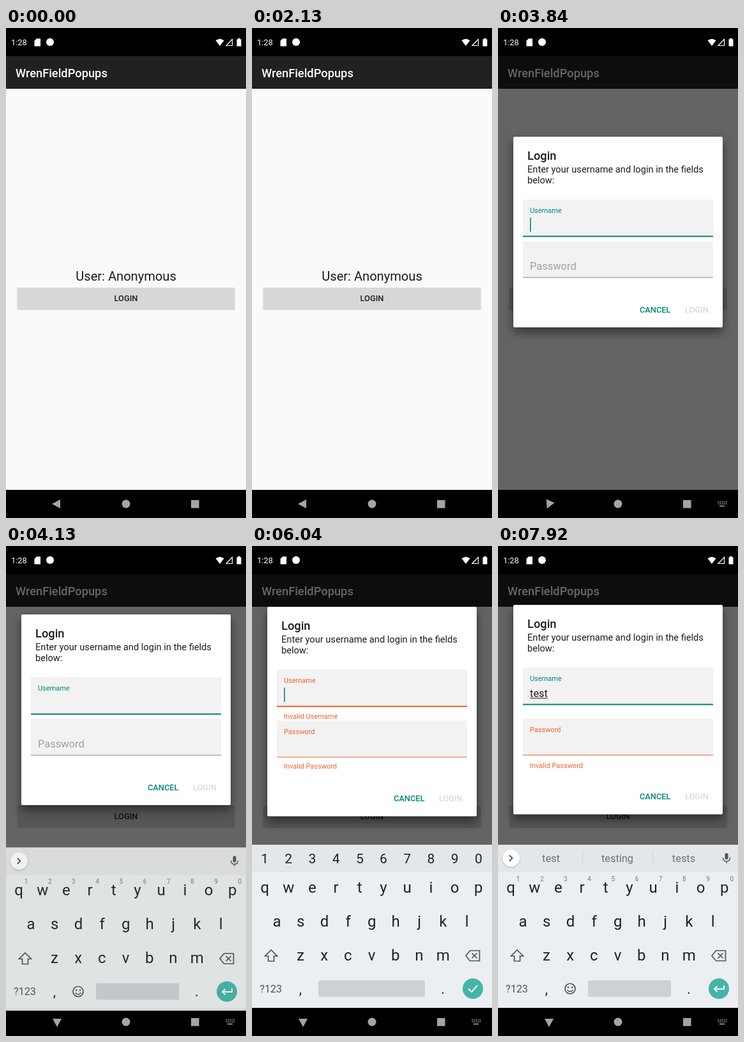
These frames come from a looping animation (376 px wide and 766 px high, 8000 ms). An HTML page:

```html
<!DOCTYPE html>
<html lang="en">
<head>
<meta charset="utf-8">
<title>Login dialog</title>
<style>
html, body { margin: 0; width: 100%; height: 100%; overflow: hidden; background: #000; }
svg { display: block; width: 376px; height: 766px; font-family: Roboto, sans-serif; }
.card { filter: drop-shadow(0 7px 8px rgba(0, 0, 0, .5)); }
.raised { filter: drop-shadow(0 1px 1px rgba(0, 0, 0, .25)); }
</style>
</head>
<body>
<svg id="stage" viewBox="0 0 376 766"></svg>
<script>
const LOOP = 8000;
const INK = '#1c1c1c', TEAL = '#00857a', RED = '#f0602c', HINT = '#9f9f9f';
const KEY = '#1b2427', ICON = '#4c5558', SPACE = '#cdd1d3', NAV = '#a4a4a4';

// Text placed by the middle of its capitals
function text(s, x, cy, size, fill, opt = '') {
  return `<text x="${x}" y="${(cy + size * .355).toFixed(2)}" font-size="${size}" fill="${fill}" ${opt}>${s}</text>`;
}
const mid = 'text-anchor="middle"', bold = 'font-weight="500"';
const rect = (x, y, w, h, fill, opt = '') =>
  `<rect x="${x}" y="${y}" width="${w}" height="${h}" fill="${fill}" ${opt}/>`;
const circle = (x, y, r, fill, opt = '') => `<circle cx="${x}" cy="${y}" r="${r}" fill="${fill}" ${opt}/>`;
const path = (d, fill, opt = '') => `<path d="${d}" fill="${fill}" ${opt}/>`;
const line = (d, color, w) => path(d, 'none', `stroke="${color}" stroke-width="${w}"`);

function statusBar() {
  const c = '#fff';
  return rect(0, 0, 376, 44, '#000') +
    text('1:28', 8, 22.5, 12.8, c) +
    path('M48 16.5h6v12h-9.5v-8.5z', c) +
    circle(69, 22, 6, c) +
    path('M328.5 19.5q6.5-5 13 0l-6.5 8.5z', c) +
    line('M354.5 17.5v10h-9.5z', c, 1.2) +
    path('M363.5 16h3v1.5h2v11h-7v-11h2z', c);
}

function page() {
  return rect(0, 43, 376, 680, '#fafafa') +
    rect(0, 43, 376, 52, '#212121') +
    text('WrenFieldPopups', 15, 70.5, 18.3, '#fff', bold) +
    text('User: Anonymous', 188, 388, 20.1, INK, mid) +
    rect(18, 406, 340, 33, '#d6d7d7', 'class="raised"') +
    text('LOGIN', 188, 422.5, 12.8, INK, `${mid} ${bold}`);
}

function field(id, name) {
  return rect(39, 0, 298, 57, '#f2f2f2', 'rx="2"') +
    `<rect id="${id}Line" x="39" width="298"/>` +
    `<text id="${id}Label" x="50">${name}</text>` +
    `<g id="${id}Error">${text('Invalid ' + name, 50, 73, 10.98, RED)}</g>` +
    rect(50, 28.5, 1.6, 22, TEAL, `id="${id}Caret"`);
}

function dialog() {
  return `<g id="dialog">` +
    rect(24, 0, 328, 298, '#fff', 'id="card" class="card" rx="2"') +
    text('Login', 46, 29.5, 18.3, INK, bold) +
    text('Enter your username and login in the fields', 46, 51, 14.64, INK) +
    text('below:', 46, 68, 14.64, INK) +
    `<g transform="translate(0 98)">${field('user', 'Username')}` +
    text('', 50, 40.5, 16.47, INK, 'id="typed"') +
    rect(50, 47.5, 0, 1, INK, 'id="typedLine"') + '</g>' +
    `<g id="passBox">${field('pass', 'Password')}</g>` +
    `<g id="actions">` + text('CANCEL', 222, 0, 12.8, TEAL, bold) +
    text('LOGIN', 293, 0, 12.8, '#dadada', bold) + '</g></g>';
}

function keyRow(chars, x0, cy, size) {
  return [...chars].map((c, i) => text(c, x0 + i * 37.2, cy, size, KEY, mid)).join('');
}

function keyboard() {
  const hints = [...'1234567890'].map((c, i) => text(c, 31.5 + i * 37.2, 520, 10, '#72797c', mid));
  const words = ['test', 'testing', 'tests'].map((w, i) => text(w, 83 + i * 104, 488, 16.4, '#6b7174', mid));
  const textMode = `<g id="textMode">` +
    circle(20.5, 488, 13.5, '#fff', 'class="raised"') +
    line('M18 483.5l4.5 4.5l-4.5 4.5', ICON, 1.8) +
    rect(355.5, 480, 5, 10, ICON, 'rx="2.5"') +
    line('M352.5 487q0 6 5.500 6t5.5-6M358 493v3', ICON, 1.4) +
    hints.join('') +
    circle(113, 692, 8, 'none', `stroke="${ICON}" stroke-width="1.7"`) +
    circle(110, 690, 1.3, ICON) + circle(116, 690, 1.3, ICON) +
    line('M108.5 694q4.5 5 9 0', ICON, 1.5) +
    rect(141, 679, 130, 26, SPACE, 'rx="3"') +
    `<g id="words">${line('M132.5 477v22M242.5 477v22', '#cfd3d5', 1)}${words.join('')}</g></g>`;
  const passMode = `<g id="passMode">` + keyRow('1234567890', 20, 488.5, 21) +
    rect(104, 679, 167, 26, SPACE, 'rx="3"') + '</g>';
  return `<g id="keyboard">` +
    rect(0, 467, 376, 256, '#eceff1') + rect(0, 467, 376, 43, '#e4e7e9') +
    rect(0, 722, 376, 44, '#000') +
    keyRow('qwertyuiop', 20, 533, 24) + keyRow('asdfghjkl', 39, 586, 24) + keyRow('zxcvbnm', 76, 639, 24) +
    line('M30 631.5l9.5 9.5h-5v8h-9v-8h-5z', ICON, 1.7) +
    line('M341.5 632.5h15v16h-15l-6.5-8zM344.5 636.5l8 8m0-8l-8 8', ICON, 1.7) +
    text('?123', 29.5, 692, 16.2, ICON, mid) + text(',', 76, 692, 22, KEY, mid) + text('.', 299, 692, 22, KEY, mid) +
    textMode + passMode + circle(346, 692, 16, '#44b4a8') +
    `<path id="enterIcon" fill="none" stroke="#fff" stroke-width="1.9"/></g>`;
}

function navIcons() {
  let dots = '';
  for (let r = 0; r < 2; r++)
    for (let i = 0; i < 5; i++) dots += rect(344.5 + i * 3, 740 + r * 3, 1.6, 1.6, NAV);
  return path('M-8 0L5-7V7z', NAV, 'id="back"') +
    circle(188, 744, 6.5, NAV) + rect(290, 738, 12.5, 12.5, NAV) +
    `<g id="imeIcon">${dots}${rect(347, 746.5, 8, 1.6, NAV)}</g>`;
}

const stage = document.getElementById('stage');
stage.innerHTML = page() + rect(0, 43, 376, 680, '#000', 'id="dim"') + dialog() +
  rect(0, 722, 376, 44, '#000') + keyboard() + statusBar() + navIcons();

const el = {};
stage.querySelectorAll('[id]').forEach(n => el[n.id] = n);
const set = (id, attrs) => { for (const k in attrs) el[id].setAttribute(k, attrs[k]); };
const show = (id, on) => set(id, { visibility: on ? 'inherit' : 'hidden' });
const ramp = (t, start, ms) => Math.min(1, Math.max(0, (t - start) / ms));
const slow = (t, start, ms) => 1 - (1 - ramp(t, start, ms)) ** 3;

// cubic-bezier(.4, 0, .2, 1)
function ease(t, start, ms) {
  const x = ramp(t, start, ms);
  let lo = 0, hi = 1;
  for (let i = 0; i < 20; i++) {
    const s = (lo + hi) / 2;
    const at = 1.2 * s * (1 - s) ** 2 + .6 * s * s * (1 - s) + s ** 3;
    if (at < x) lo = s; else hi = s;
  }
  return lo * lo * (3 - 2 * lo);
}

const OPEN = 2300, FOCUS = 3630, RESIZE = 3700, KEYS = 4020, TO_PASS = 5000, BACK = 5885;
const MOVE = 400;
const STROKES = [6750, 6960, 7170, 7390];
const WIDTHS = [0, 5.4, 14.1, 22.6, 28];

function drawField(id, float, focused, error) {
  const color = error ? RED : focused ? TEAL : HINT;
  const size = 16.47 - 5.49 * float;
  set(id + 'Label', { 'font-size': size, y: 39.5 - 22 * float + size * .355, fill: color });
  set(id + 'Line', {
    y: focused ? 56.7 : 56.5, height: focused ? 2 : 1,
    fill: error || focused ? color : '#868686'
  });
  show(id + 'Error', error);
}

function dropError(id, t, start) {
  set(id + 'Error', {
    opacity: ramp(t, start, 120),
    transform: `translate(0 ${-4.6 * (1 - ramp(t, start + 45, 217))})`
  });
}

function draw(t) {
  const typed = STROKES.filter(s => t >= s).length;
  const userErr = t >= TO_PASS && !typed, passErr = t >= BACK;
  const userOn = t >= FOCUS && (t < TO_PASS || t >= BACK), passOn = t >= TO_PASS && t < BACK;
  const gap = t >= TO_PASS ? 15 : 0, height = 298 + gap + (passErr ? 14.5 : 0);

  set('dim', { opacity: .6 * ramp(t, OPEN, 220) });
  const top = 234.5 - 127.5 * ease(t, RESIZE, MOVE) -
    7.5 * ease(t, TO_PASS, MOVE) - 7.5 * ease(t, BACK, MOVE);
  const k = .9 + .1 * slow(t, OPEN, 150);
  set('dialog', {
    opacity: ramp(t, OPEN, 150),
    transform: `translate(${188 * (1 - k)} ${top + height / 2 * (1 - k)}) scale(${k})`
  });
  set('card', { height });
  set('passBox', { transform: `translate(0 ${163 + gap})` });
  set('actions', { transform: `translate(0 ${height - 27.7})` });

  drawField('user', ease(t, FOCUS, 167), userOn, userErr);
  drawField('pass', ease(t, TO_PASS, 167), passOn, passErr);
  dropError('user', t, TO_PASS);
  dropError('pass', t, BACK);

  // The caret blinks from the latest focus or keystroke
  const since = [FOCUS, TO_PASS, BACK, ...STROKES].filter(s => t >= s).pop();
  const lit = since !== undefined && (t - since) % 1000 < 490;
  show('userCaret', userOn && lit);
  show('passCaret', passOn && lit);
  set('userCaret', { x: 50 + WIDTHS[typed] });
  el.typed.textContent = 'test'.slice(0, typed);
  set('typedLine', { width: WIDTHS[typed] });

  const passKeys = t >= TO_PASS + 200 && t < BACK + 200;
  const rise = slow(t, KEYS, 200);
  set('keyboard', { opacity: rise, transform: `translate(0 ${51 * (1 - rise)})` });
  show('textMode', !passKeys);
  show('passMode', passKeys);
  show('words', !passKeys && typed >= 3);
  set('enterIcon', { d: passKeys ? 'M339 692l5 5l9-10' : 'M354 687v5.5h-15M343.5 688l-4.5 4.5l4.5 4.5' });

  set('back', { transform: `translate(80 744) rotate(${-90 * ease(t, RESIZE, 300)})` });
  show('imeIcon', t >= RESIZE);
}

const start = performance.now();
function tick() {
  draw((performance.now() - start) % LOOP);
  requestAnimationFrame(tick);
}
tick();
</script>
</body>
</html>
```
